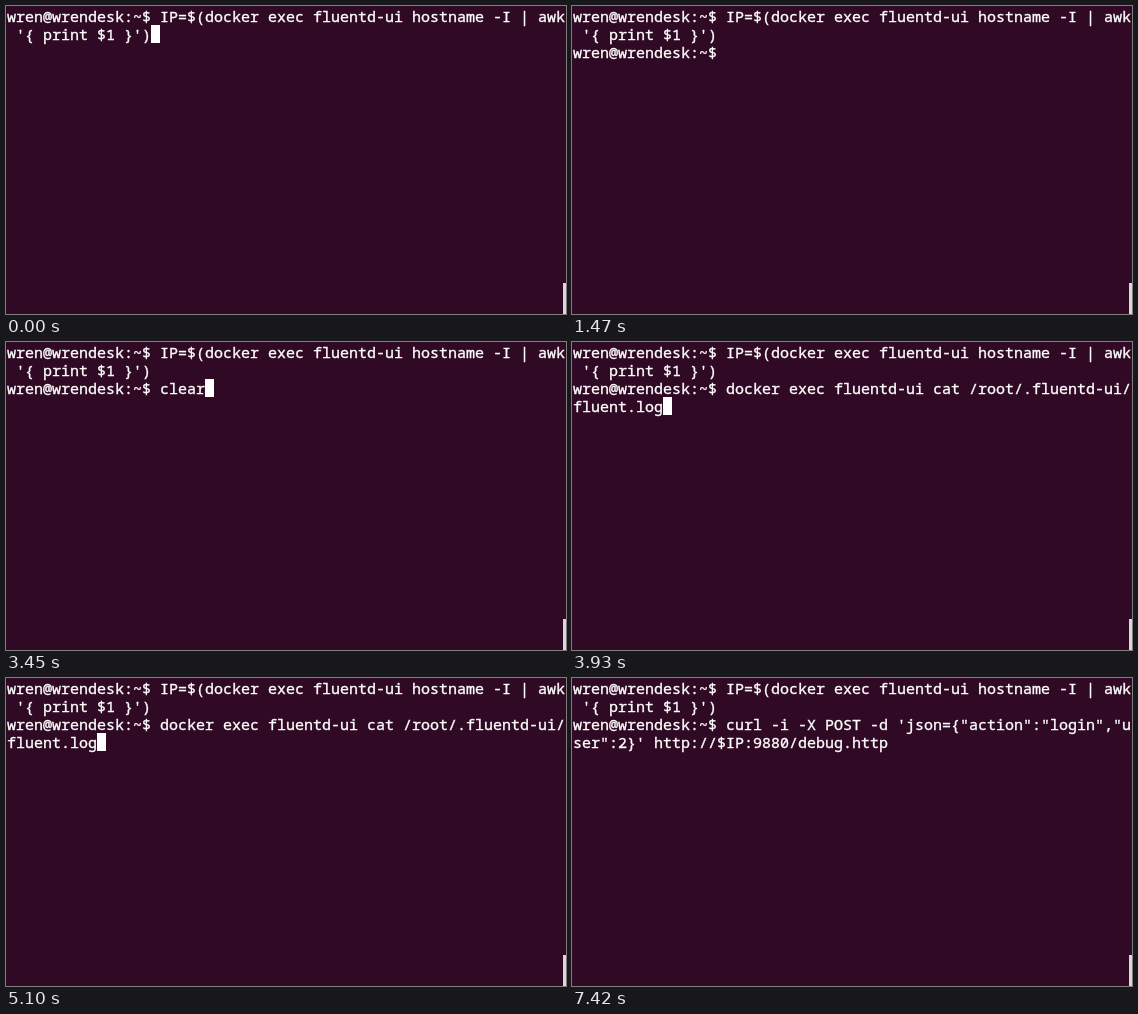
Animation, 560 px wide and 308 px high, one loop 8000 ms. Source, as an HTML page:

```html
<!DOCTYPE html>
<html lang="en">
<head>
<meta charset="utf-8">
<title>Terminal history</title>
<style>
  html, body { margin: 0; width: 100%; height: 100%; overflow: hidden; background: #300a24; }
  svg { display: block; }
  text {
    font: 15px "Noto Sans Mono", "DejaVu Sans Mono", monospace;
    font-variant-ligatures: none;
    white-space: pre;
    fill: #fff;
    stroke: #fff;
    stroke-width: 0.35px;
  }
</style>
</head>
<body>
<svg id="screen" width="560" height="308" viewBox="0 0 560 308">
  <rect width="560" height="308" fill="#300a24"/>
  <rect x="557" y="277" width="3" height="31" fill="#dcd8d6"/>
  <rect id="cursor" width="9" height="18" fill="#fff"/>
</svg>
<script>
const LOOP = 8000, COLS = 62, CELL_W = 9, CELL_H = 18, LEFT = 1, TOP = 1, BASELINE = 15;
const PROMPT = "wren@wrendesk:~$ ";
const ADDRESS = "IP=$(docker exec fluentd-ui hostname -I | awk '{ print $1 }')";
const CLEAR = "clear";
const LOG = "docker exec fluentd-ui cat /root/.fluentd-ui/fluent.log";
const POST = "curl -i -X POST -d 'json={\"action\":\"login\",\"user\":2}' http://$IP:9880/debug.http";

// Start time, text after the first command, cursor visible
const steps = [
  [0, null, true],
  [890, "", true],
  [930, PROMPT, true],
  [1470, PROMPT, false],
  [2050, PROMPT, true],
  [2680, PROMPT, false],
  [2840, PROMPT + ADDRESS, true],
  [3450, PROMPT + CLEAR, true],
  [3930, PROMPT + LOG, true],
  [4440, PROMPT + POST, true],
  [4990, PROMPT + LOG, true],
  [5690, PROMPT + LOG, false],
  [6270, PROMPT + LOG, true],
  [6830, PROMPT + POST, true],
  [7420, PROMPT + POST, false]
];

const screen = document.getElementById("screen");
const cursor = document.getElementById("cursor");
const rows = Array.from({ length: 4 }, (_, i) => {
  const row = document.createElementNS("http://www.w3.org/2000/svg", "text");
  row.setAttribute("x", LEFT);
  row.setAttribute("y", TOP + i * CELL_H + BASELINE);
  return screen.appendChild(row);
});

function wrap(text) {
  const lines = [];
  for (let i = 0; i === 0 || i < text.length; i += COLS) lines.push(text.slice(i, i + COLS));
  return lines;
}

function draw([, entry, lit]) {
  const lines = wrap(PROMPT + ADDRESS);
  if (entry !== null) lines.push(...wrap(entry));
  rows.forEach((row, i) => { row.textContent = lines[i] || ""; });
  const last = lines.length - 1;
  cursor.setAttribute("x", LEFT + lines[last].length * CELL_W);
  cursor.setAttribute("y", TOP + last * CELL_H);
  cursor.setAttribute("visibility", lit ? "visible" : "hidden");
}

const start = performance.now();
let shown = null;
function tick() {
  const time = (performance.now() - start) % LOOP;
  const step = steps.findLast(s => s[0] <= time);
  if (step !== shown) {
    shown = step;
    draw(step);
  }
  requestAnimationFrame(tick);
}
tick();
</script>
</body>
</html>
```
